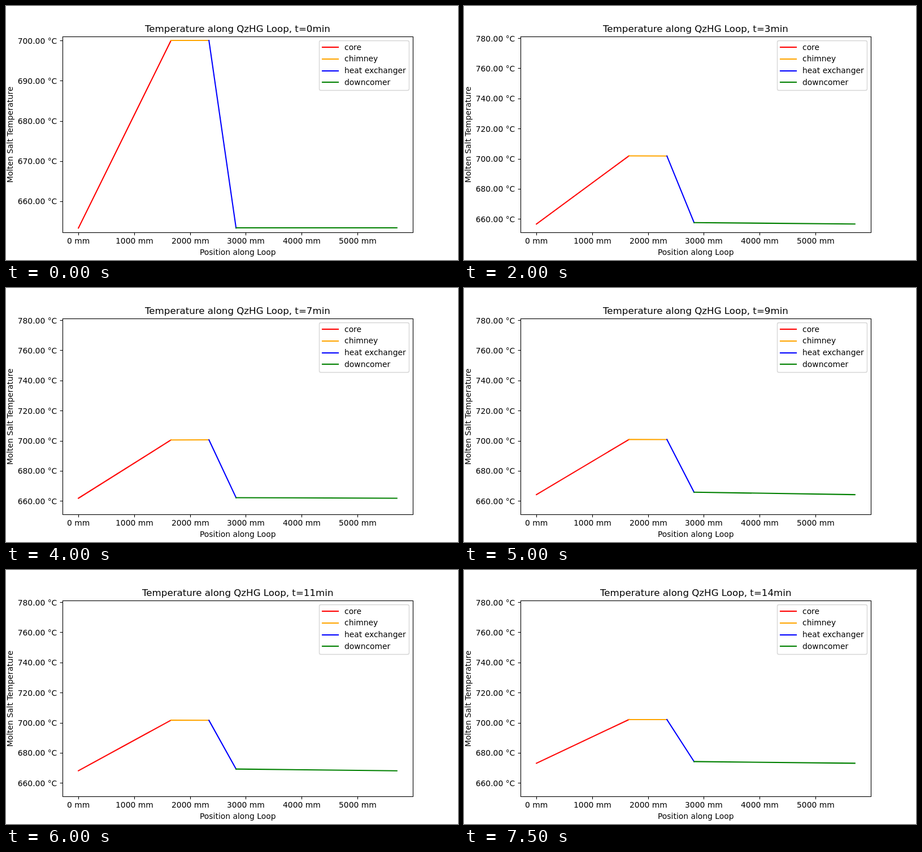
An HTML page that plays this animation: 800 by 450 pixels, repeating every 8000 ms.

```html
<!DOCTYPE html>
<html lang="en">
<head>
<meta charset="utf-8">
<title>Loop temperature</title>
<style>
  html, body { margin: 0; width: 100%; height: 100%; overflow: hidden; background: #fff; }
  svg { display: block; }
  text { font: 13.89px "DejaVu Sans", sans-serif; }
  #title { font-size: 16.67px; }
  .frame { fill: none; stroke: #000; stroke-width: 1.11; }
  .line { fill: none; stroke-width: 2.08; stroke-linecap: square; stroke-linejoin: round; }
  .mid { text-anchor: middle; }
  .end { text-anchor: end; }
</style>
</head>
<body>
<svg id="stage" width="800" height="450" viewBox="0 0 800 450"></svg>
<script>
const stage = document.getElementById('stage');
const parts = [['core', 'red'], ['chimney', 'orange'], ['heat exchanger', 'blue'], ['downcomer', 'green']];
const ends = [128.18, 292, 359.2, 407.2, 691.8];   // x where the parts meet

// Key points as [minute, temperature]
const inlet = [[0, 653.33], [1, 652.8], [2, 654.2], [4, 659.1], [7, 661.8], [9, 664.2], [12, 670.05], [14, 673.1]];
const coreTop = [[0, 700], [3, 701.9], [7, 700.5], [9, 700.8], [12, 702.1], [14, 702.1]];
const cooled = [[0, 653.33], [1, 653.6], [3, 657.6], [5, 660.8], [7, 662.2], [10, 667.6], [14, 674.2]];

function at(keys, minute) {
  const m = Math.max(0, minute);
  const next = Math.max(1, keys.findIndex(([t]) => t >= m));
  const [t0, v0] = keys[next - 1], [t1, v1] = keys[next];
  return v0 + (v1 - v0) * (m - t0) / (t1 - t0);
}

function add(tag, attrs, content = '', parent = stage) {
  const el = document.createElementNS('http://www.w3.org/2000/svg', tag);
  for (const key in attrs) el.setAttribute(key, attrs[key]);
  el.textContent = content;
  return parent.appendChild(el);
}
const snap = v => Math.round(v) + 0.5;
const toY = (temp, first) => first ? 61.15 + (700 - temp) * 7.12 : 377.3 - (temp - 660) * 2.669;

// Centres text while keeping its left edge on a whole pixel
function center(text, x) {
  text.setAttribute('x', Math.round(x - text.getComputedTextLength() / 2 + 0.3));
}

function addScale(first, low, high, step) {
  const group = add('g', {});
  for (let temp = low; temp <= high; temp += step) {
    const y = toY(temp, first);
    add('path', { class: 'frame', d: `M100.5 ${snap(y)}h-4.86` }, '', group);
    add('text', { class: 'end', x: 90.3, y: Math.ceil(y) + 5 }, temp.toFixed(2) + ' °C', group);
  }
  return group;
}

const scales = [addScale(true, 660, 700, 10), addScale(false, 660, 780, 20)];
for (let k = 0; k < 6; k++) {
  const x = ends[0] + k * 98.77;
  add('path', { class: 'frame', d: `M${snap(x)} 401.5v4.86` });
  center(add('text', { y: 421 }, k * 1000 + ' mm'), x);
}
center(add('text', { y: 441 }, 'Position along Loop'), 410);
add('text', { class: 'mid', transform: 'translate(12 228) rotate(-90)' }, 'Molten Salt Temperature');
const title = add('text', { id: 'title', y: 46 });

const lines = parts.map(([, stroke]) => add('path', { class: 'line', stroke }));
add('rect', { class: 'frame', x: 100.5, y: 54.5, width: 620, height: 347 });
add('rect', { x: 554.5, y: 61.5, width: 159, height: 88, rx: 2.8, fill: '#fff', 'fill-opacity': 0.8, stroke: '#d6d6d6', 'stroke-width': 1.39 });
parts.forEach(([name, stroke], i) => {
  const drop = i * 20.7;
  add('path', { class: 'line', stroke, d: `M560 ${Math.round(73.2 + drop)}h28` });
  add('text', { x: 599, y: Math.round(77.7 + drop) }, name);
});

function draw(minute) {
  const first = minute === 0;
  title.textContent = `Temperature along QzHG Loop, t=${minute}min`;
  center(title, 410);
  scales[0].style.display = first ? '' : 'none';
  scales[1].style.display = first ? 'none' : '';

  // The chimney outlet follows the core outlet with a short delay
  const start = at(inlet, minute);
  const temps = [start, at(coreTop, minute), at(coreTop, minute - 0.2), at(cooled, minute), start];
  const ys = temps.map(temp => toY(temp, first));
  lines.forEach((line, i) => {
    const flat = ys[i] === ys[i + 1];
    const [y1, y2] = [ys[i], ys[i + 1]].map(y => flat ? Math.round(y) : y.toFixed(2));
    line.setAttribute('d', `M${ends[i]} ${y1}L${ends[i + 1]} ${y2}`);
  });
}

let shown = -1;
function tick() {
  const minute = Math.max(0, Math.floor(performance.now() % 8000 / 500) - 1);
  if (minute !== shown) draw(shown = minute);
  requestAnimationFrame(tick);
}
tick();
</script>
</body>
</html>
```
